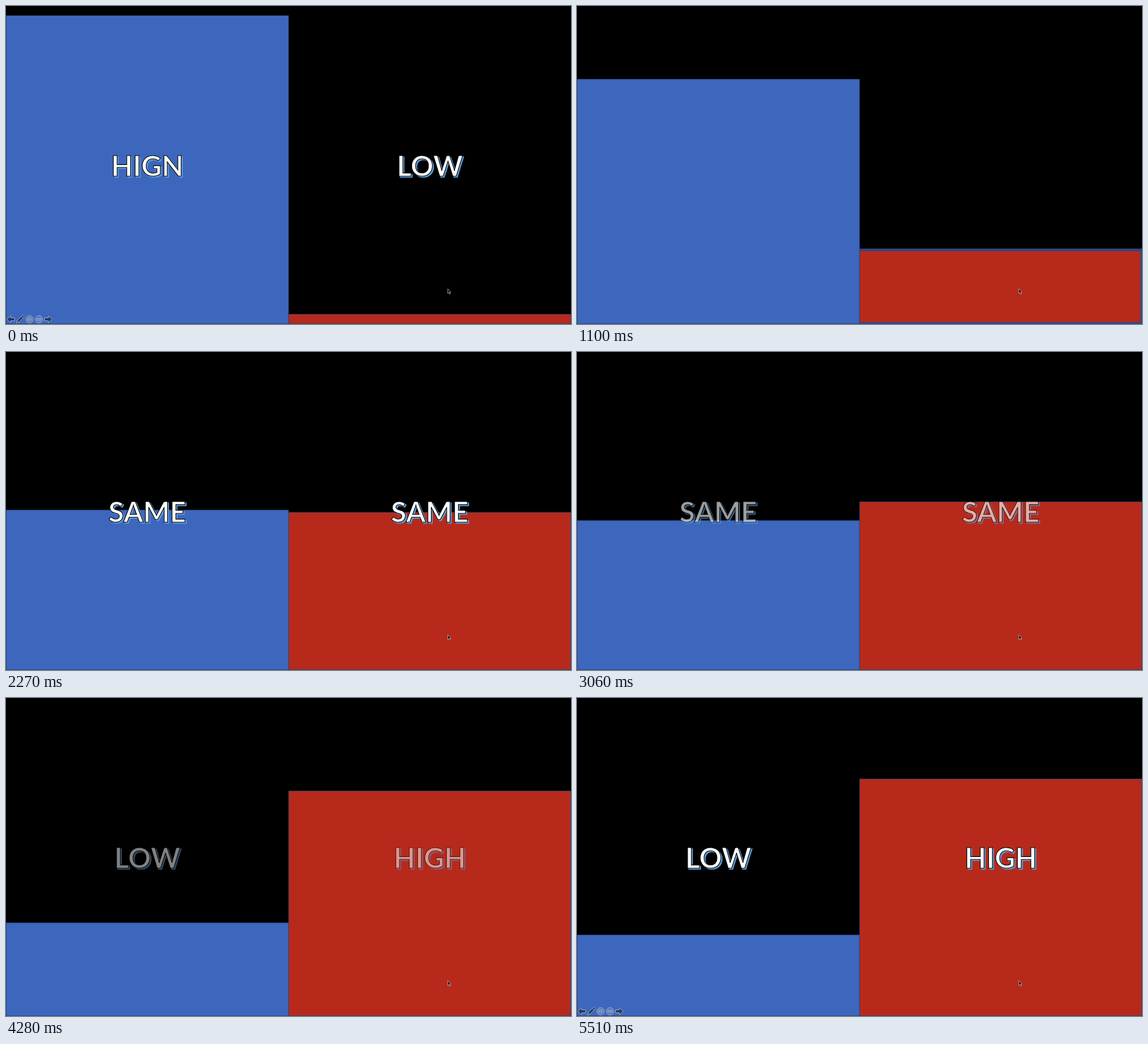
These frames come from a looping animation (960 px wide and 540 px high, 5610 ms). An HTML page:

```html
<!DOCTYPE html>
<html lang="en">
<meta charset="utf-8">
<title>High and low</title>
<style>
  html, body { margin: 0; height: 100%; overflow: hidden; background: #000; }
  svg { display: block; width: 960px; height: 540px; }
  .bar { stroke: #2c4a80; stroke-width: .8; }
  .word { font: 700 48px Lato, Carlito, sans-serif; text-anchor: middle; }
  .shadow { fill: #5b9bd5; stroke: #5b9bd5; stroke-width: 1; }
  .face { fill: #fff; stroke: #000; stroke-width: 1.1; }
  .edge { fill: #2b4a82; }
  #controls { fill: #243a61; stroke: #9aabc8; stroke-width: 1; stroke-linejoin: round; }
  #controls circle { fill: #8c9dbd; fill-opacity: .35; }
  #controls .detail { fill: none; stroke-width: .9; }
</style>
<svg viewBox="0 0 960 540">
  <defs>
    <linearGradient id="soft">
      <stop offset="0" stop-color="#2b4a82" stop-opacity="0"/>
      <stop offset="1" stop-color="#2b4a82"/>
    </linearGradient>
  </defs>
  <rect id="blue" class="bar" x=".4" width="479.6" fill="#3d67bd"/>
  <rect id="red" class="bar" x="480.2" width="479.4" fill="#b72a1b"/>
  <rect id="topEdge" class="edge" x="480" width="480"/>
  <rect id="bottomEdge" class="edge" x="480" width="480"/>
  <rect id="sideEdge" fill="url(#soft)"/>
  <g id="words"></g>
  <g id="controls">
    <path d="M1.5 532l6.5-6v3.5h6.5v5H8v3.5z"/>
    <path d="M17.5 538.5l1.5-4.5 8.5-8.5q1.500-1 2.500 0t.5 2.500L22 537z"/>
    <path class="detail" d="M19 534l3 3M26 527l3 3"/>
    <circle cx="40" cy="532" r="6.300"/>
    <path class="detail" d="M37 529.500h6v4.500h-6zM37 532h6"/>
    <circle cx="56" cy="532" r="6.300"/>
    <path class="detail" d="M52.500 530.500h7v3h-7zM55 530.500v3M57.500 530.500v3"/>
    <path d="M78.500 532l-6.500-6v3.500h-6.500v5h6.500v3.500z"/>
  </g>
  <path d="M750.700 480.300v7.700l1.700-1.500 1.300 2.700 1.300-.6-1.200-2.600h2.200z"
        fill="#000" stroke="#ddd" stroke-width=".7"/>
</svg>
<script>
const LOOP = 5610;
const poses = [
  { blue: 16.3, red: 523.4, words: ['HIGN', 'LOW'] },
  { blue: 270.3, red: 270.3, words: ['SAME', 'SAME'] },
  { blue: 402.3, red: 137.4, words: ['LOW', 'HIGH'] }
];
// [ms, position in the pose sequence]; repeated positions are pauses
const timeline = [
  [0, 0], [100, 0], [660, .188], [700, .188], [1100, .461], [1220, .461],
  [1260, .506], [1360, .506], [1720, .761], [1910, .823], [2270, .937],
  [2450, 1], [2550, 1], [3060, 1.245], [3160, 1.245], [3620, 1.443],
  [3670, 1.5], [3770, 1.5], [4280, 1.722], [4380, 1.722], [4940, 1.939],
  [5040, 1.939], [5200, 2], [LOOP, 2]
];

const $ = id => document.getElementById(id);
const clamp = v => Math.max(0, Math.min(1, v));
const mix = (a, b, k) => a + (b - a) * k;
const ease = u => u < .5 ? 2 * u * u : 1 - 2 * (1 - u) ** 2;

function set(id, attrs) {
  for (const name in attrs) $(id).setAttribute(name, attrs[name]);
}

$('words').innerHTML = poses.map(({ words }) => '<g class="word">' +
  words.map((word, i) => {
    const x = 240 + 480 * i;
    return `<text class="shadow" x="${x + 2.1}" y="290.6">${word}</text>
            <text class="face" x="${x}" y="288.500">${word}</text>`;
  }).join('') + '</g>').join('');
const groups = [...$('words').children];

function positionAt(t) {
  const i = timeline.findIndex(([end]) => end > t);
  const [t0, u0] = timeline[i - 1], [t1, u1] = timeline[i];
  return mix(u0, u1, (t - t0) / (t1 - t0));
}

function draw(t) {
  const u = positionAt(t);
  const i = Math.min(Math.floor(u), 1);
  const p = ease(u - i);
  const blue = mix(poses[i].blue, poses[i + 1].blue, p);
  const red = mix(poses[i].red, poses[i + 1].red, p);
  set('blue', { y: blue, height: 539.6 - blue });
  set('red', { y: red, height: 539.6 - red });

  // The stretched outline of the red bar swells during the first morph
  const w = i ? 0 : 16 * p * (1 - p);
  set('topEdge', { y: red - w, height: w });
  set('bottomEdge', { y: 540 - w * .8, height: w * .8 });
  set('sideEdge', { x: 960 - w * 1.3, y: red, width: w * 1.3, height: 540 - red });

  groups.forEach((group, n) => {
    group.style.opacity = 1 - clamp((Math.abs(u - n) - .13) / .3);
  });
  $('controls').style.display = Number.isInteger(u) ? '' : 'none';
}

function tick() {
  draw(performance.now() % LOOP);
  requestAnimationFrame(tick);
}
tick();
</script>
</html>
```
